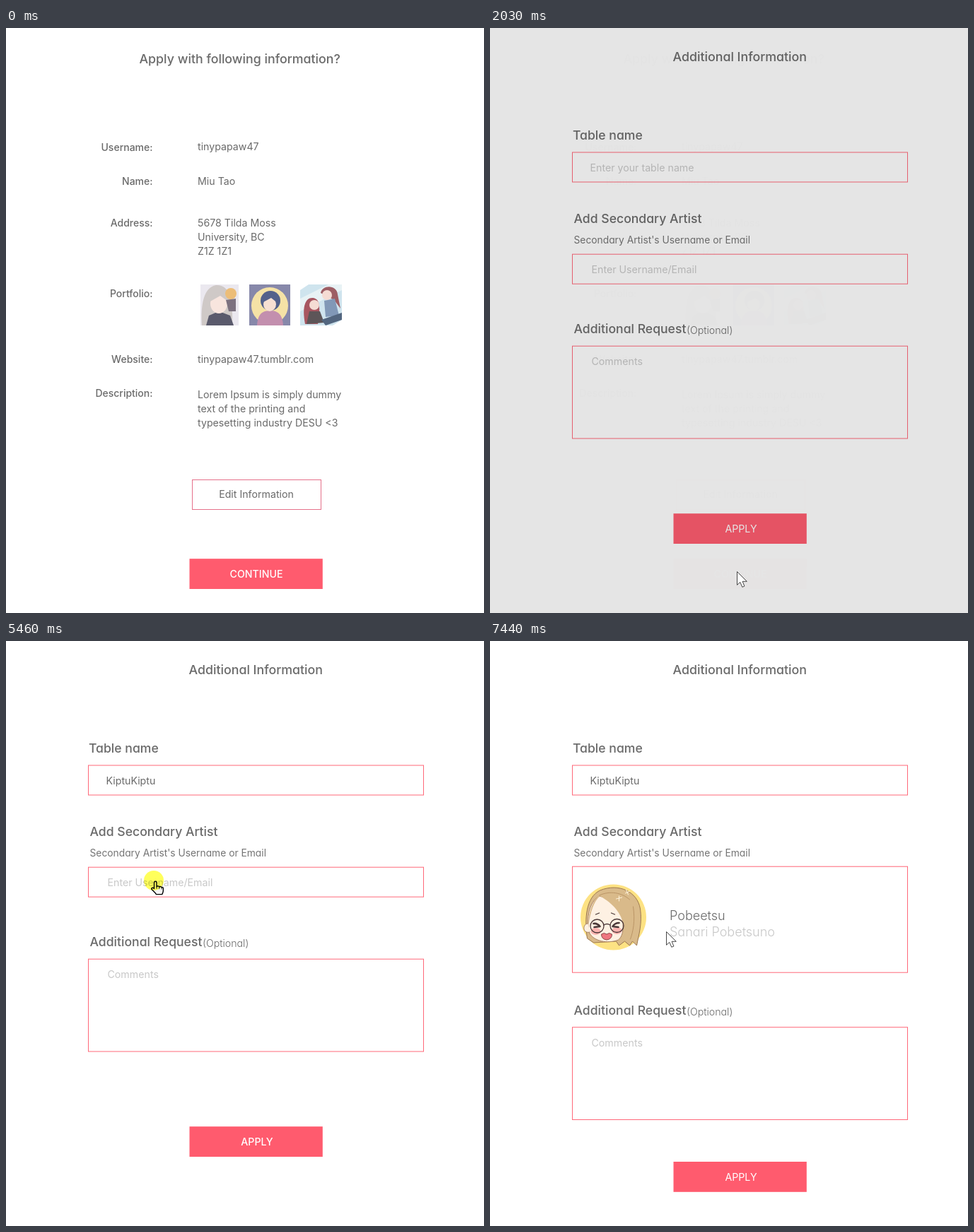
An HTML page for the animation above (8 s loop, 676 by 828 pixels).

```html
<!DOCTYPE html>
<html lang="en">
<head>
<meta charset="utf-8">
<title>Application form</title>
<style>
  html, body { margin: 0; width: 100%; height: 100%; overflow: hidden; background: #000; }
  svg { display: block; width: 676px; height: 828px; }
  svg svg { width: auto; height: auto; }
  text { font: 14.2px Inter, "Noto Sans", sans-serif; fill: #6a6a6a; white-space: pre; }
  .round { font-feature-settings: "cv11"; }
  .title { font-size: 17.8px; font-weight: 500; }
  .head { font-size: 17.6px; font-weight: 500; }
  .sub { font-size: 13.8px; fill: #747474; }
  .light { font-weight: 300; }
  .label { font-size: 14px; font-weight: 500; text-anchor: end; }
  .strong { font-weight: 500; }
  .hint { fill: #c8c8c8; }
  .person { font-size: 18px; }
  .mid { text-anchor: middle; }
  .on { fill: #fff; }
  .box { fill: #fff; stroke: #ff6879; }
  .button { fill: #ff5b6e; }
  .line { fill: none; stroke: #4a3838; stroke-linecap: round; stroke-linejoin: round; }
  #click { fill: #ffff5c; mix-blend-mode: multiply; }
</style>
</head>
<body>
<svg viewBox="0 0 676 828">
  <g id="review">
    <rect width="676" height="828" fill="#fff"/>
    <text class="round title" x="188.5" y="50">Apply with following information?</text>

    <text class="label" x="207.5" y="174">Username:</text>
    <text class="label" x="207.5" y="222">Name:</text>
    <text class="label" x="207.5" y="281">Address:</text>
    <text class="label" x="207.5" y="381">Portfolio:</text>
    <text class="label" x="207.5" y="474">Website:</text>
    <text class="label" x="207.5" y="522">Description:</text>

    <text x="271" y="173">tinypapaw47</text>
    <text x="271" y="222">Miu Tao</text>
    <text x="271" y="281">5678 Tilda Moss</text>
    <text x="271" y="301">University, BC</text>
    <text x="271" y="321">Z1Z 1Z1</text>
    <text x="271" y="474">tinypapaw47.tumblr.com</text>
    <text x="271" y="524">Lorem Ipsum is simply dummy</text>
    <text x="271" y="544">text of the printing and</text>
    <text x="271" y="564">typesetting industry DESU &lt;3</text>

    <!-- Portfolio thumbnails as flat silhouettes -->
    <g transform="translate(275 363)">
      <rect width="54" height="58" fill="#ebe8ef"/>
      <path d="M2 58C0 30 4 4 22 1C42 0 46 22 45 58Z" fill="#cfc9c7"/>
      <path d="M8 58L12 44L26 38L42 44L47 58Z" fill="#5a5a6c"/>
      <ellipse cx="26" cy="27" rx="12" ry="14" fill="#f8e5de"/>
      <path d="M12 25C14 8 34 6 39 24L28 16Z" fill="#cfc9c7"/>
      <circle cx="43" cy="13" r="8" fill="#ecbd78"/>
      <path d="M36 22L50 20V38H40Z" fill="#7d7280"/>
    </g>
    <g transform="translate(344 363)">
      <rect width="58" height="58" fill="#8788aa"/>
      <circle cx="29" cy="30" r="26" fill="#f5e2a6"/>
      <path d="M11 58C12 40 20 37 30 37S47 42 48 58Z" fill="#c38fae"/>
      <circle cx="30" cy="23" r="14" fill="#53618b"/>
      <ellipse cx="29" cy="28" rx="9" ry="10" fill="#f7e0d3"/>
      <path d="M18 26C20 12 37 10 41 27L31 19Z" fill="#53618b"/>
    </g>
    <g transform="translate(416 363)">
      <path d="M0 8L12 0H59V50L46 58H0Z" fill="#cfe4ee"/>
      <path d="M0 20L40 0H59V8L0 38Z" fill="#e8f2f5"/>
      <path d="M7 56C2 30 8 18 18 19S29 32 25 56Z" fill="#a75660"/>
      <path d="M9 56L13 38H28L34 54Z" fill="#5d5558"/>
      <circle cx="20" cy="29" r="7" fill="#f5dcd4"/>
      <path d="M29 12C31 0 52 0 53 14L57 34L48 22Z" fill="#9d5e65"/>
      <circle cx="38" cy="15" r="7" fill="#f5dcd4"/>
      <path d="M34 23L49 20L55 44L36 46Z" fill="#8198b7"/>
      <path d="M30 50L59 40V50L36 58Z" fill="#53667f"/>
    </g>

    <rect x="263.5" y="639.5" width="182" height="42" fill="#fff" stroke="#e5708a"/>
    <text class="mid" x="354" y="665">Edit Information</text>
    <rect class="button" x="259.5" y="751.2" width="188.3" height="42.8"/>
    <text class="mid on strong" x="354" y="778">CONTINUE</text>
  </g>

  <g id="form">
    <rect width="676" height="828" fill="#fff"/>
    <text class="round title" x="258.5" y="47">Additional Information</text>
    <text class="round head" x="117" y="158">Table name</text>
    <rect class="box" x="116.5" y="176" width="474" height="42"/>
    <text id="tableHint" class="hint" x="141.5" y="203">Enter your table name</text>
    <text id="tableName" x="141.5" y="203">KiptuKiptu</text>

    <text class="round head" x="118.5" y="276">Add Secondary Artist</text>
    <text class="round sub" x="118.5" y="305">Secondary Artist's Username or Email</text>
    <rect class="box" x="116.5" y="320.2" width="474" height="42"/>
    <text id="artistHint" class="hint" x="143.5" y="347">Enter Username/Email</text>
    <text id="artistQuery" x="143.5" y="347">Pobee</text>

    <g id="request">
      <text class="round head" x="118.5" y="432">Additional Request</text>
      <text class="round light" x="278" y="433">(Optional)</text>
      <rect class="box" x="116.5" y="450.2" width="474" height="130.8"/>
      <text class="hint" x="143.5" y="477">Comments</text>
    </g>

    <g id="match">
      <rect class="box" x="116.5" y="362.2" width="474" height="150"/>
      <g transform="translate(174.5 434)">
        <circle r="46.5" fill="#fde283"/>
        <path d="M-37 30C-41 2-39-28-19-38C8-49 34-36 38-12C41 9 36 24 33 40L27 34L23 40L16 34L8 40L4 34L-28 36Z"
              fill="#d9ba8a" stroke="#9c774f"/>
        <path d="M-21-30C-7-28 12-17 13 4C15 20 12 28 7 32C-8 38-28 34-34 22C-39 0-34-20-21-30Z"
              fill="#fef1e3" stroke="#a98365"/>
        <path d="M-33 21C-44 24-44 9-36 9" fill="#fef1e3" stroke="#a98365"/>
        <path d="M-21-31C-32-20-36 0-35 10C-32-8-28-22-19-30C-5-22 10-10 14 10C18-12 2-30-21-31Z" fill="#d9ba8a"/>
        <path d="M-20-31C-5-38 12-35 23-25M28-15C31 5 28 20 24 31" class="line" style="stroke:#b38c5d;stroke-width:.8"/>
        <g fill="#fbb4b0">
          <ellipse cx="-25" cy="20" rx="7" ry="5"/>
          <ellipse cx="5" cy="19" rx="7" ry="5"/>
        </g>
        <g class="line" stroke-width="1.3">
          <circle cx="-23" cy="12.5" r="9.5"/>
          <circle cx="5" cy="12" r="9.5"/>
          <path d="M-13.5 11Q-9 8-4.5 11M-25-4L-20-6M-3-6L2-4"/>
        </g>
        <path class="line" stroke-width="2.6" d="M-28 9Q-23 8-19 13L-27 14M8 8Q2 8-1 13L7 14"/>
        <path d="M-17 24Q-13 21-9.5 24Q-6 21-2 24Q-2 31-9.5 32Q-17 31-17 24Z" fill="#ef7780" stroke="#8d4a4c"/>
        <path class="line" style="stroke:#fff4dd" d="M4-26L12-28M8-30V-23M17-34L23-37M18-39L21-32"/>
      </g>
      <text class="round person light" x="254" y="438">Pobeetsu</text>
      <text class="round person light hint" x="254" y="461">Sanari Pobetsuno</text>
    </g>

    <g id="apply">
      <rect class="button" x="259.5" y="687.2" width="188.3" height="42.8"/>
      <text id="applyText" class="mid on" x="355" y="714">APPLY</text>
    </g>
  </g>

  <g id="cursor">
    <path id="arrow" transform="translate(.5 .5)" fill="#fff" stroke="#333" stroke-width=".9"
          d="M0 0V18.8L4.3 14.9L7.3 21.8L10.4 20.5L7.6 13.8H13.8Z"/>
    <g id="hand" transform="translate(2 1)" stroke="#000" stroke-width="1.4" stroke-linejoin="round">
      <path fill="#f4f4f4" d="M-1.5 10.5V2a1.8 1.8 0 0 1 3.6 0V8c.4-1.6 3.2-1.6 3.6.2c.6-1.2 3-1 3.4.7c.8-.8 2.3-.4 2.3 1.4V13c0 3-1 4-1.6 5.6H1.5C0 16-2.5 14-5 11.5C-6 9.8-3.6 8.2-1.5 10.5Z"/>
      <path fill="none" stroke-width=".8" d="M2.1 8V11M5.7 8.2V11.2M9.1 9V11.5"/>
    </g>
    <circle id="click" r="14"/>
  </g>
</svg>

<script>
const LOOP = 8000;
const el = Object.fromEntries([...document.querySelectorAll('[id]')].map(e => [e.id, e]));

// Pointer stops: [arrive, leave, x, y]
const stops = [
  [700, 700, 367, 787],
  [1030, 2750, 349, 769],
  [3060, 3060, 177, 117],
  [3360, 4570, 202, 203],
  [5090, 6180, 209, 339],
  [6380, 6380, 224, 394],
  [6670, LOOP, 249, 411]
];
const handSpans = [[700, 1780], [3230, 3930], [4950, 5880], [6270, 7150]];
const clickSpans = [[1530, 1730], [3640, 3880], [5460, 5690], [6860, 7100]];
const dissolve = [0.316, 0.113, 0.012, 0];

const clamp = v => Math.min(1, Math.max(0, v));
const easeOut = p => 1 - (1 - p) ** 3;
const easeInOut = p => p * p * (3 - 2 * p);
const ramp = (t, from, to) => easeOut(clamp((t - from) / (to - from)));
const within = (t, spans) => spans.some(([from, to]) => t >= from && t < to);
const fade = (node, v) => node.setAttribute('opacity', v);
const show = (node, on) => node.setAttribute('visibility', on ? 'visible' : 'hidden');
const move = (node, x, y) => node.setAttribute('transform', `translate(${x} ${y})`);

function pointerAt(t) {
  const next = stops.findIndex(s => t < s[0]);
  if (next < 0) return stops[stops.length - 1].slice(2);
  const i = Math.max(1, next);
  const [, leave, x0, y0] = stops[i - 1], [arrive, , x1, y1] = stops[i];
  const p = easeInOut(clamp((t - leave) / (arrive - leave)));
  return [x0 + (x1 - x0) * p, y0 + (y1 - y0) * p];
}

function draw(t) {
  const old = t < 1960 ? 1 : dissolve[Math.min(3, Math.floor((t - 1960) / 70))];
  fade(el.review, old);
  fade(el.form, 1 - old);

  const named = ramp(t, 3860, 4160);
  const matched = ramp(t, 5810, 6150);
  const chosen = ramp(t, 7090, 7440);
  fade(el.tableHint, 1 - named);
  fade(el.tableName, named);
  fade(el.artistHint, 1 - matched);
  fade(el.artistQuery, matched);
  fade(el.match, matched);
  move(el.match, 0, -43 * chosen);
  move(el.request, 0, 96.5 * chosen);
  move(el.apply, 0, 49.8 * chosen);
  el.applyText.style.fontWeight = named > 0.5 && chosen < 0.5 ? 500 : 400;

  const shown = t >= 700, hand = within(t, handSpans);
  move(el.cursor, ...pointerAt(t));
  show(el.arrow, shown && !hand);
  show(el.hand, shown && hand);
  show(el.click, within(t, clickSpans));
}

function tick() {
  draw(performance.now() % LOOP);
  requestAnimationFrame(tick);
}
tick();
</script>
</body>
</html>
```
